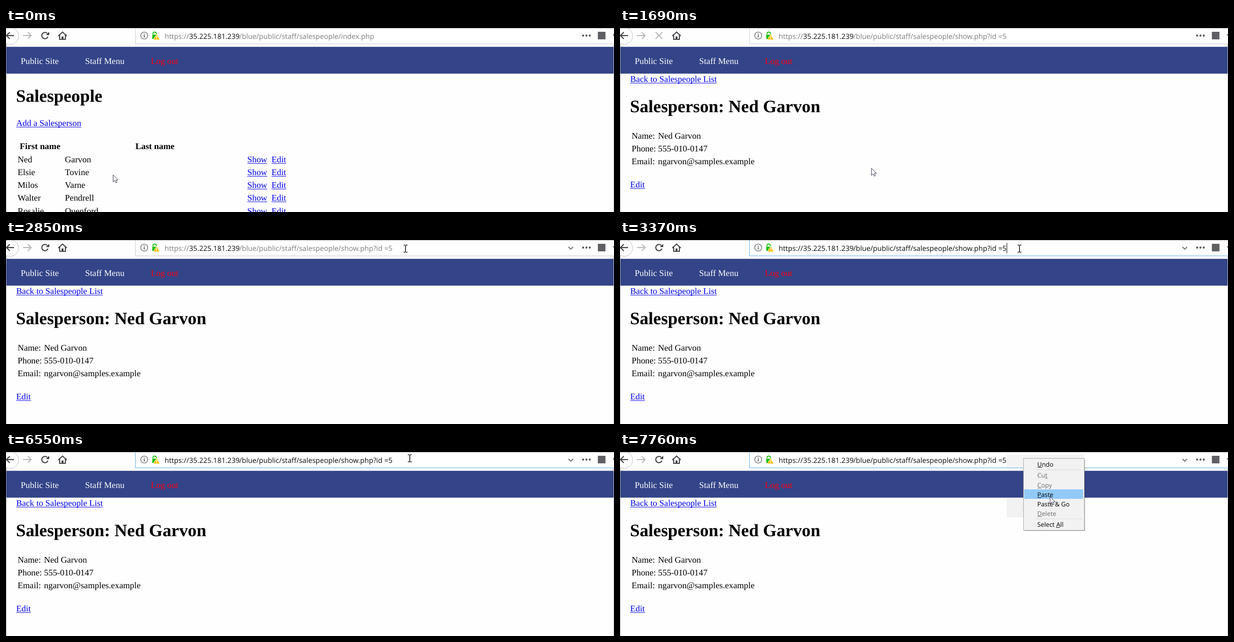
Recreate the animation shown at these times as an HTML page with a canvas. Size 1280 px wide and 389 px high, loop 8 s.

```html
<!DOCTYPE html>
<html lang="en">
<head>
<meta charset="utf-8">
<title>Salespeople</title>
<style>
html, body { margin: 0; width: 100%; height: 100%; overflow: hidden; background: #fefefe; }
canvas { display: block; }
</style>
</head>
<body>
<canvas id="stage" width="1280" height="389"></canvas>
<script>
const ctx = document.getElementById('stage').getContext('2d');
const LOOP = 8000;
const SERIF = '18.4px "Liberation Serif", serif';
const BOLD = 'bold ' + SERIF;
const HEAD = 'bold 36.8px "Liberation Serif", serif';
const UI = '15px "Open Sans", sans-serif';
const MENU = '13.25px "Open Sans", sans-serif';
const INK = '#3f3f43', LINK = '#0000ee';

const person = { first: 'Ned', last: 'Garvon', phone: '555-010-0147', mail: 'ngarvon@samples.example' };
const people = [
  [person.first, person.last], ['Elsie', 'Tovine'], ['Milos', 'Varne'],
  ['Walter', 'Pendrell'], ['Rosalie', 'Quenford']
];
const menuItems = [
  // label, baseline, underlined letter, enabled
  ['Undo', 31, 0, true], ['Cut', 54, 2, false], ['Copy', 74.5, 0, false],
  ['Paste', 94.5, 0, true], ['Paste & Go', 115, -1, true],
  ['Delete', 135, 0, false], ['Select All', 158, 7, true]
];

// time, x, y, pointer shape
const pointer = [
  [0, 225, 310, 'arrow'], [150, 258, 306, 'arrow'], [280, 345, 293, 'arrow'],
  [420, 440, 281, 'arrow'], [550, 498, 274, 'arrow'], [690, 515, 269, 'hand'],
  [1690, 529, 296, 'arrow'], [1820, 590, 245, 'arrow'], [1950, 685, 155, 'arrow'],
  [2080, 780, 65, 'arrow'], [2230, 836, 18, 'beam'], [2350, 841, 16, 'beam'],
  [2610, 844, 15, 'beam'], [2850, 841, 18, 'beam'], [3760, 0, 0, 'none'],
  [4950, 1247, 368, 'arrow'], [5080, 1180, 275, 'arrow'], [5210, 1085, 170, 'arrow'],
  [5350, 975, 85, 'arrow'], [5500, 885, 28, 'arrow'], [5690, 850, 13, 'beam'],
  [6670, 850, 13, 'arrow'], [6950, 862, 38, 'arrow'], [7080, 880, 84, 'arrow'],
  [7210, 893, 112, 'arrow'], [7480, 901, 106, 'arrow'], [7620, 905, 94, 'arrow']
];
const caretOn = [[3370, 3900], [4210, 4790], [5320, 5840], [6100, 6550], [7080, 7620]];

function text(str, x, y, font, color = '#000') {
  ctx.font = font;
  ctx.fillStyle = color;
  ctx.fillText(str, x, y);
  return ctx.measureText(str).width;
}

function link(str, x, y) {
  const w = text(str, x, y, SERIF, LINK);
  ctx.fillRect(x, Math.round(y) + 2, Math.round(w), 1);
}

function rect(x, y, w, h, color) {
  ctx.fillStyle = color;
  ctx.fillRect(x, y, w, h);
}

function line(points, color, width = 1) {
  ctx.beginPath();
  points.forEach(([x, y]) => ctx.lineTo(x, y));
  ctx.strokeStyle = color;
  ctx.lineWidth = width;
  ctx.stroke();
}

function poly(points, fill, stroke) {
  ctx.beginPath();
  points.forEach(([x, y]) => ctx.lineTo(x, y));
  ctx.closePath();
  ctx.fillStyle = fill;
  ctx.fill();
  if (stroke) {
    ctx.strokeStyle = stroke;
    ctx.lineWidth = 1;
    ctx.stroke();
  }
}

function arc(x, y, r, color, width, from = 0, to = Math.PI * 2) {
  ctx.beginPath();
  ctx.arc(x, y, r, from, to);
  ctx.strokeStyle = color;
  ctx.lineWidth = width;
  ctx.stroke();
}

function dot(x, y, r, color) {
  ctx.beginPath();
  ctx.arc(x, y, r, 0, Math.PI * 2);
  ctx.fillStyle = color;
  ctx.fill();
}

function navButtons(loading) {
  arc(9, 17, 17.5, '#bcbcbc', 1);
  line([[1, 16], [17, 16]], INK, 2.2);
  line([[8, 9], [1, 16], [8, 23]], INK, 2.2);
  line([[36, 16], [53, 16]], '#b4b4b6', 2);
  line([[46, 9], [53, 16], [46, 23]], '#b4b4b6', 2);
  if (loading) {
    line([[75, 9], [89, 23]], '#b4b4b6', 2);
    line([[89, 9], [75, 23]], '#b4b4b6', 2);
  } else {
    arc(82, 16, 6.7, INK, 2.3, 0.35, 5.5);
    poly([[91, 8], [91, 15], [84, 15]], INK);
  }
  line([[110, 17], [119, 8.5], [128, 17]], INK, 2.2);
  line([[113, 15], [113, 24], [125, 24], [125, 15]], INK, 2.2);
  rect(117, 18, 4, 6, INK);
}

function siteIcons() {
  arc(291, 16, 7.4, '#68686b', 1.4);
  rect(290, 15, 2, 5, '#68686b');
  rect(290, 12, 2, 2, '#68686b');
  arc(313, 12, 3.6, '#12bc00', 2, Math.PI * 0.9, Math.PI * 2.1);
  rect(308, 14, 11, 9, '#12bc00');
  poly([[317, 13], [324, 25], [310, 25]], '#ffbf00', '#fff');
  rect(316.3, 17, 1.5, 4, '#fff');
  rect(316.3, 22, 1.5, 1.5, '#fff');
}

function addressBar(s) {
  const edge = s.focus ? '#5fb0ec' : '#cacaca';
  rect(272, 1, 1008, 33, '#fff');
  rect(272, 1, 1, 33, edge);
  rect(272, 33, 1008, 1, edge);
  siteIcons();

  const dim = s.focus ? '#0c0c0d' : '#7c7c7e';
  const base = '/blue/public/staff/salespeople/';
  text('https://', 334, 23, UI, dim);
  text('35.225.181.239', 385.5, 23, UI, '#0c0c0d');
  if (s.detail) {
    text(base + 'show.php?id', 491, 23, UI, dim);
    text('=5', 796.5, 23, UI, dim);
  } else {
    text(base + 'index.php', 491, 23, UI, dim);
  }
  if (s.caret) rect(814, 6, 1, 22, '#000');

  if (s.chevron) line([[1184, 14.5], [1189, 19.5], [1194, 14.5]], '#68686b', 1.8);
  [1215, 1222, 1229].forEach(x => dot(x, 16, 2.2, '#5a5a5e'));
  rect(1246, 8, 16, 16, '#5f5f64');
  rect(1278, 13, 2, 3, '#68686b');
}

function navBar() {
  rect(0, 39, 1280, 1, '#d4d4d8');
  rect(0, 40, 1280, 56.5, '#334488');
  text('Public Site', 31, 76, SERIF, '#fff');
  text('Staff Menu', 166.5, 76, SERIF, '#fff');
  text('Log out', 305, 76, SERIF, '#ff0011');
}

function listPage() {
  text('Salespeople', 21, 155.5, HEAD);
  link('Add a Salesperson', 21.5, 207);
  text('First name', 29, 256, BOLD);
  text('Last name', 272.5, 256, BOLD);
  people.forEach(([first, last], i) => {
    const y = 283.5 + i * 27.3;
    text(first, 24.5, y, SERIF);
    text(last, 124, y, SERIF);
    link('Show', 508, y);
    link('Edit', 559, y);
  });
}

function detailPage() {
  const name = person.first + ' ' + person.last;
  link('Back to Salespeople List', 21.5, 114);
  text('Salesperson: ' + name, 21, 178, HEAD);
  [['Name:', name], ['Phone:', person.phone], ['Email:', person.mail]].forEach(([label, value], i) => {
    const y = 233.5 + i * 27.3;
    text(label, 24.5, y, SERIF);
    text(value, 80, y, SERIF);
  });
  link('Edit', 21.5, 337);
}

function contextMenu(hover, veil) {
  if (veil) {
    rect(814, 5, 162, 28, '#f3f3f3');
    rect(814, 97, 36, 41, '#f2f2f2');
  }
  rect(852, 16, 127, 151, 'rgba(0,0,0,.28)');
  rect(849, 13, 129, 153, '#a5a5a5');
  rect(850, 14, 127, 151, '#f2f2f2');
  rect(875, 37, 98, 1, '#d5d5d5');
  rect(875, 141, 98, 1, '#d5d5d5');
  if (hover >= 0) rect(851, menuItems[hover][1] - 15.5, 124, 20, '#91c9f7');
  menuItems.forEach(([label, y, mark, enabled]) => {
    text(label, 878.5, y, MENU, enabled ? '#000' : '#6d6d6d');
    if (mark < 0) return;
    const x = 878.5 + ctx.measureText(label.slice(0, mark)).width;
    ctx.fillRect(Math.round(x), Math.round(y) + 1, Math.round(ctx.measureText(label[mark]).width), 1);
  });
}

const shapes = {
  none() {},
  arrow() {
    poly([[0.5, 0.5], [0.5, 15.5], [4, 12.3], [6.4, 17.5], [8.8, 16.5], [6.5, 11.3], [11, 11.3]], '#fff', '#33334a');
  },
  hand() {
    poly([[-1.5, 0.5], [1.5, 0.5], [1.5, 6.5], [10.5, 8.5], [10.5, 14], [8.5, 20.5], [-1, 20.5],
      [-6, 13.5], [-5, 11.5], [-1.5, 13.5]], '#fff', '#000');
    line([[4.5, 7.5], [4.5, 11]], '#000');
    line([[7.5, 8], [7.5, 11.5]], '#000');
  },
  beam() {
    rect(-0.7, -7, 1.5, 15, '#000');
    [-8, 7].forEach(y => {
      rect(-4, y, 3.3, 1.4, '#000');
      rect(0.8, y, 3.3, 1.4, '#000');
    });
  }
};

function drawPointer([, x, y, shape]) {
  ctx.save();
  ctx.translate(x, y);
  shapes[shape]();
  ctx.restore();
}

function hoverAt(t) {
  if (t < 7080) return -1;
  return t >= 7210 && t < 7620 ? 4 : 3;
}

function draw(t) {
  const s = {
    detail: t >= 1390,
    loading: t >= 1260 && t < 2080,
    chevron: t >= 2350,
    focus: t >= 3370,
    caret: caretOn.some(([from, to]) => t >= from && t < to)
  };
  rect(0, 0, 1280, 389, '#fefefe');
  navButtons(s.loading);
  addressBar(s);
  navBar();
  if (s.detail) detailPage(); else listPage();
  rect(0, 0, 1280, 1, '#a9a9a9');
  rect(0, 34, 1, 355, '#a9a9a9');
  rect(1279, 34, 1, 355, '#c4c4c8');
  if (t >= 6670) {
    const veil = t >= 7620;
    contextMenu(hoverAt(t), veil);
    if (veil) {
      // the address stays readable beside the menu
      rect(814, 33, 35, 1, '#5fb0ec');
    }
  }
  drawPointer(pointer.findLast(step => step[0] <= t));
}

ctx.textRendering = 'geometricPrecision';
const start = performance.now();
function tick() {
  draw((performance.now() - start) % LOOP);
  requestAnimationFrame(tick);
}
tick();
</script>
</body>
</html>
```
